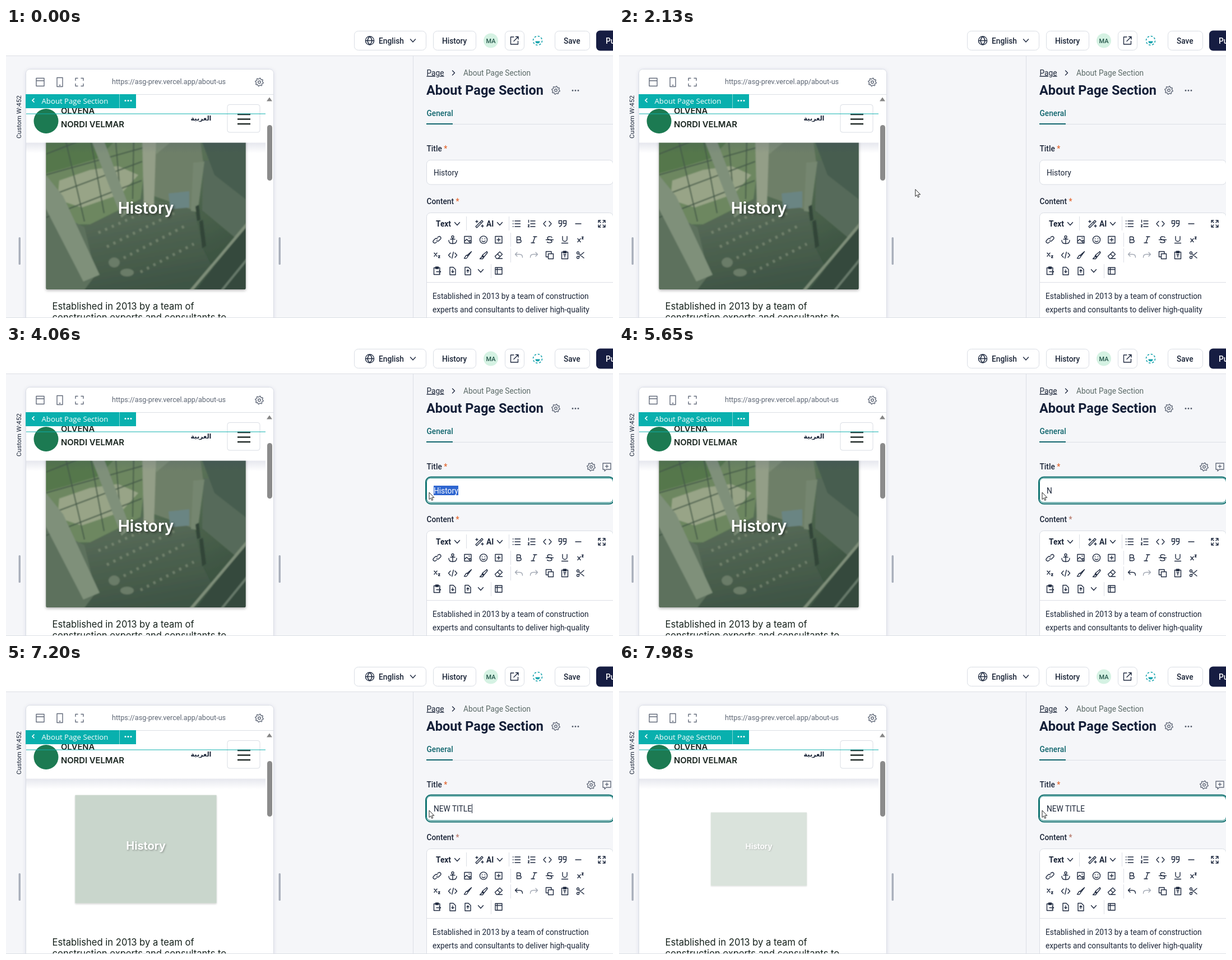
Recreate the animation shown at these times as an HTML page. Size 1083x517 px, loop 8 s.

```html
<!DOCTYPE html>
<html lang="en">
<head>
<meta charset="utf-8">
<title>Page section editor</title>
<style>
html, body { margin: 0; width: 100%; height: 100%; overflow: hidden; background: #f5f6f9; }
svg { display: block; }
text { font: 13.72px Roboto, sans-serif; fill: #1b2538; white-space: pre; }
.med { font-weight: 500; }
.bold { font-weight: 700; }
.site { font-family: Inter, sans-serif; font-size: 16.6px; fill: #16221c; }
.brand { font: 600 14.8px Inter, sans-serif; fill: #16221c; }
.card { fill: #fff; stroke: #d9dde4; }
.line { stroke: #dcdfe5; fill: none; }
.icon { fill: none; stroke: #1f2a40; stroke-width: 1.4; stroke-linecap: round; stroke-linejoin: round; }
.gray { stroke: #636b7b; }
</style>
</head>
<body>
<svg width="1083" height="517" viewBox="0 0 1083 517">
  <defs>
    <linearGradient id="room" x2=".6" y2="1"><stop stop-color="#6f8766"/><stop offset="1" stop-color="#3a5140"/></linearGradient>
    <linearGradient id="floor" x2=".3" y2="1"><stop stop-color="#5d705c"/><stop offset="1" stop-color="#3e5444"/></linearGradient>
    <linearGradient id="fade" x2="0" y2="1"><stop stop-color="#2b3570" stop-opacity=".12"/><stop offset="1" stop-color="#2b3570" stop-opacity="0"/></linearGradient>
    <filter id="blur"><feGaussianBlur stdDeviation="1.3"/></filter>
    <filter id="drop" x="-10%" y="-10%" width="120%" height="120%"><feDropShadow dx="0" dy="2" stdDeviation="2.5" flood-opacity=".3"/></filter>
    <filter id="textDrop" x="-20%" y="-40%" width="140%" height="190%"><feDropShadow dx="2" dy="2" stdDeviation="2" flood-opacity=".5"/></filter>
    <filter id="soft" x="-5%" y="-5%" width="110%" height="110%"><feDropShadow dx="0" dy="1" stdDeviation="3" flood-color="#30405f" flood-opacity=".1"/></filter>
    <clipPath id="photoClip"><rect x="71.5" y="194" width="356" height="272" rx="2"/></clipPath>
    <clipPath id="pageClip"><rect x="36" y="204.5" width="427" height="313"/></clipPath>
    <clipPath id="selClip"><rect id="selArea" y="249" width="44" height="17"/></clipPath>
  </defs>

  <!-- top bar -->
  <rect width="1083" height="49" fill="#fff"/>
  <path class="line" d="M0 49.5H1083M726.5 50V517"/>
  <g class="card">
    <rect x="621.5" y="5.5" width="128" height="34" rx="7"/>
    <rect x="762.5" y="5.5" width="76" height="34" rx="7"/>
    <rect x="890.5" y="5.5" width="34" height="34" rx="7"/>
    <rect x="979.5" y="5.5" width="62" height="34" rx="7"/>
  </g>
  <text class="med" x="665" y="27.5">English</text>
  <text class="med" x="778" y="27.5">History</text>
  <circle cx="865" cy="22.5" r="13" fill="#d5f2e3"/>
  <text class="med" x="865" y="26.5" text-anchor="middle" style="font-size:11px;fill:#24564a">MA</text>
  <g fill="none" stroke="#16a3ad" stroke-width="1.6">
    <circle cx="948.5" cy="22.5" r="8" stroke-dasharray="3.4 2.88"/>
    <path d="M944.5 23.500a4 4 0 0 0 8 0z" fill="#16a3ad" stroke="none"/>
  </g>
  <text class="med" x="995" y="27.5">Save</text>
  <rect x="1053" y="4.5" width="60" height="36" rx="7" fill="#161d42"/>
  <text class="med" x="1070" y="27.5" style="fill:#fff">Pu</text>

  <!-- preview -->
  <text transform="translate(27 197)rotate(-90)" style="font-size:11.75px">Custom W:452</text>
  <g fill="#a9afbb"><rect x="22.5" y="373" width="3.5" height="49" rx="1.5"/><rect x="486.5" y="373" width="3.5" height="49" rx="1.5"/></g>
  <rect class="card" x="35.5" y="73.5" width="442" height="460" rx="7" filter="url(#soft)"/>
  <path class="line" d="M36 118.5H477"/>
  <text x="189" y="99.5" style="font-size:12.6px;fill:#5d6674">https://asg-prev.vercel.app/about-us</text>

  <g clip-path="url(#pageClip)">
    <g id="hero">
      <g id="photo" filter="url(#drop)"><g clip-path="url(#photoClip)">
        <rect x="71" y="194" width="357" height="273" fill="url(#room)"/>
        <g filter="url(#blur)">
          <path fill="#6d8760" d="M60 190H255L240 305 150 350 60 350z"/>
          <path fill="#55774b" d="M60 190H205L165 232 105 250 60 262z"/>
          <path fill="#98a487" d="M95 272 150 253 200 246 236 262 205 296 135 320 92 306z"/>
          <path fill="url(#floor)" d="M140 355 245 305 335 320 352 395 395 480H100z"/>
          <path fill="#5d715d" d="M60 315 140 355 160 440 130 480H60z"/>
          <path fill="#6e7f68" d="M262 190H345L352 240 335 325 265 300z"/>
          <path fill="#566a5a" d="M352 236H440V400L350 325z"/>
          <path fill="#475d50" d="M345 190H440V315L372 262z"/>
          <path fill="#7d8d74" d="M262 190H310L268 225z"/>
          <g fill="none" stroke="#465c4a" stroke-width="2">
            <path d="M71 262 250 212M71 302 243 238M71 338 242 272M105 194 140 345M150 194 175 330M195 194 205 310M228 194 226 305M71 225 150 194"/>
            <path stroke="#8e9b83" stroke-width="5" stroke-dasharray="4 9" d="M165 365 265 320M180 390 300 330M210 410 325 350M240 435 335 385" opacity=".55"/>
          </g>
          <path fill="#7f907a" d="M71 262 102 300 167 440 138 452 71 322zM150 194H172L222 325 206 338z"/>
          <path fill="#939e87" d="M243 194H268L264 318 246 322z"/>
          <path fill="#75866f" d="M334 240 354 238 342 328 330 326z"/>
          <path fill="#6b8583" d="M290 295 327 291V320L293 323z"/>
          <path fill="#304439" d="M345 345 351 342 357 388 350 393zM338 318 344 315 347 342 341 344z"/>
          <path fill="#34493c" d="M330 480 440 335V480z"/>
          <path stroke="#7d8d78" stroke-width="5" d="M320 480 440 338"/>
          <path stroke="#67796a" stroke-width="4" d="M375 480 440 400"/>
          <g fill="#6a7b68"><ellipse cx="193" cy="418" rx="10" ry="9"/><ellipse cx="216" cy="436" rx="12" ry="7"/></g>
        </g>
      </g></g>
      <rect id="tint" x="71.5" y="194" width="356" height="272" fill="#b4c6b8" filter="url(#drop)"/>
      <text class="site" x="249.5" y="331" text-anchor="middle" filter="url(#textDrop)" style="font-size:28.4px;font-weight:600;fill:#fff">History</text>
    </g>
    <text class="site" x="82.5" y="502">Established in 2013 by a team of</text>
    <text class="site" x="82.5" y="522">construction experts and consultants to</text>
    <rect x="36" y="204" width="427" height="19" fill="url(#fade)"/>
  </g>

  <circle cx="71.5" cy="166" r="22" fill="#1c7a52"/>
  <text class="brand" x="98" y="153">OLVENA</text>
  <text class="brand" x="98" y="177">NORDI VELMAR</text>
  <text x="348" y="165" text-anchor="middle" style="font:bold 11.2px 'DejaVu Sans',sans-serif">العربية</text>
  <rect x="395" y="136.5" width="58" height="49.5" rx="4" class="card"/>
  <path d="M413 154H436M413 162.5H436M413 171H436" stroke="#222b28" stroke-width="2.4"/>
  <path d="M36 153H463" stroke="#0fb0ae"/>
  <path d="M35 118H232V143H35z" fill="#08b0ae"/>
  <path d="M202.5 118V143" stroke="#7fd6d4"/>
  <path d="M50.5 125.5 47 129l3.5 3.5" fill="none" stroke="#fff" stroke-width="1.6"/>
  <text x="63.5" y="135" style="font:13.2px 'Open Sans',sans-serif;fill:#fff">About Page Section</text>
  <g fill="#fff"><circle cx="213" cy="129.5" r="1.5"/><circle cx="218" cy="129.5" r="1.5"/><circle cx="223" cy="129.5" r="1.5"/></g>
  <path d="M465 130.5 470 123.5 475 130.5z" fill="#868686"/>
  <rect x="466" y="173" width="9" height="99" rx="4.5" fill="#8b8b8b"/>

  <!-- settings panel -->
  <text x="750.5" y="84.5" style="text-decoration:underline;text-underline-offset:2px">Page</text>
  <path class="icon" d="M796.5 76 800.5 80 796.5 84"/>
  <text x="816" y="84.5" style="fill:#5c6b68">About Page Section</text>
  <text class="bold" x="750" y="119" style="font-size:23.5px;fill:#141f38">About Page Section</text>
  <g fill="#555d6c"><circle cx="1011" cy="111.5" r="1.4"/><circle cx="1016" cy="111.5" r="1.4"/><circle cx="1021" cy="111.5" r="1.4"/></g>
  <text class="med" x="750.5" y="157" style="fill:#11666e">General</text>
  <path class="line" d="M750 171.5H1083"/>
  <path d="M750 171H797" stroke="#11666e" stroke-width="2"/>
  <text class="med" x="750.5" y="220">Title <tspan fill="#e4662f">*</tspan></text>
  <text class="med" x="750.5" y="313.5">Content <tspan id="star">*</tspan></text>
  <rect id="ring" x="749" y="233.5" width="336" height="48" rx="9" fill="#fff" stroke="#11706f" stroke-width="2"/>
  <rect class="card" x="750.5" y="235.5" width="333" height="43.5" rx="7"/>
  <rect id="accent" x="750.5" y="235.5" width="333" height="43.5" rx="7" fill="none" stroke="#11807c"/>
  <text id="field" x="763" y="262.5"></text>
  <g id="selection" clip-path="url(#selClip)">
    <rect x="763" y="249" width="44" height="17" fill="#2f66d0"/>
    <text x="763" y="262.5" style="fill:#fff">History</text>
  </g>
  <path id="caret" d="M.5 249.5V266" stroke="#1b2538"/>

  <rect class="card" x="750.5" y="329.5" width="333" height="220" rx="7"/>
  <path class="line" d="M751 453.5H1083M821.5 336V361M897.5 336V361M900.5 365V390M900.5 393V418M865.5 421V446"/>
  <text class="bold" x="767" y="354">Text</text>
  <text class="bold" x="857" y="354">AI</text>
  <text x="761" y="482.5">Established in 2013 by a team of construction</text>
  <text x="761" y="507">experts and consultants to deliver high-quality</text>

  <g id="icons"></g>
  <g id="titleTools"></g>
  <g id="contentTools"></g>
  <path class="line" d="M0 516.5H1083"/>
  <path id="arrow" d="M0 0v12.5l2.8-2.6 1.9 4.4 2-.9-1.9-4.2h4z" fill="#fff" stroke="#111" stroke-width=".9"/>
  <path id="beam" d="M-3-6h2l1 .8 1-.8h2M-3 6h2l1-.8 1 .8h2M0-5.2V5.2" fill="none" stroke="#111" stroke-width="1.1"/>
</svg>
<script>
const $ = id => document.getElementById(id);
const clamp = v => Math.min(1, Math.max(0, v));
const show = (id, opacity) => $(id).setAttribute('opacity', +opacity);
const move = (id, x, y) => $(id).setAttribute('transform', `translate(${x} ${y})`);

const circle = (r, x = 0, y = 0) => `M${x - r} ${y}a${r} ${r} 0 1 0 ${2 * r} 0a${r} ${r} 0 1 0 ${-2 * r} 0`;
const cog = 'M' + Array.from({ length: 32 }, (_, i) => {
  const r = i % 4 < 2 ? 7.2 : 5.6, a = (i + .5) * Math.PI / 16;
  return (r * Math.cos(a)).toFixed(1) + ' ' + (r * Math.sin(a)).toFixed(1);
}).join(' ') + 'z' + circle(2.3);
const box = 'M-6-6h12v12h-12z', doc = 'M-5-6.5h6l4 4v9.5h-10z', clip = 'M-2.5-7h5v3h-5z';
const shapes = {
  cog, layout: 'M-7-7h14v14h-14zM-7-2.5h14', phone: 'M-5-8h10v16h-10zM-1 5.5h2',
  corners: 'M-7-3v-4h4M3-7h4v4M7 3v4h-4M-3 7h-4v-4', chevron: 'M-4.5-2.5 0 2.5 4.5-2.5',
  globe: circle(7.6) + 'M-7.6 0h15.2M0-7.6c-5 5-5 10.2 0 15.2c5-5 5-10.2 0-15.2',
  open: 'M-1-6.5h-5.5v13h13v-5.5M2.5-7h4.5v4.5M7-7-1 1',
  expand: 'M-6-2v-4h4M2-6h4v4M6 2v4h-4M-2 6h-4v-4M-6-6-2-2M6-6 2-2M6 6 2 2M-6 6-2 2',
  bullets: 'M-3-5h9.5M-3 0h9.5M-3 5h9.5M-6.5-5h.5M-6.5 0h.5M-6.5 5h.5',
  numbers: 'M-2-5h8M-2 0h8M-2 5h8M-5.5-6.5v4M-6.5 2h2l-2 3.5h2',
  code: 'M-3-4.5-7 0-3 4.5M3-4.5 7 0 3 4.5',
  quote: 'M-6.5-5.5h5v5c0 3-1 4.5-4 5.5M-6.5-5.5v5h5M1.5-5.5h5v5c0 3-1 4.5-4 5.5M1.5-5.5v5h5',
  rule: 'M-5 0h10',
  link: 'M-1 4l-1.5 1.5a2.9 2.9 0 0 1-4-4l3-3a2.9 2.9 0 0 1 4 0M1-4l1.5-1.5a2.9 2.9 0 0 1 4 4l-3 3a2.9 2.9 0 0 1-4 0',
  anchor: 'M0-3v10M-4-1h8M-7 1c0 4 3 6 7 6s7-2 7-6' + circle(2, 0, -5),
  image: box + 'M-6 3-2-1 5 6M2 3 3.5 1 6 3.5M2-3h1', smile: circle(6.6) + 'M-3 2q3 3 6 0M-2.5-2v.5M2.5-2v.5',
  plus: box + 'M-3 0h6M0-3v6',
  bold: 'M-3.5-5.2h4a2.6 2.6 0 0 1 0 5.2h-4zM-3.5 0h5a2.6 2.6 0 0 1 0 5.2h-5z',
  italic: 'M-1-5.5h6M-5 5.5h6M2-5.5-2 5.5', strike: 'M4-4c-1-2.5-8-2-8 1c0 2 2 2.5 4 3s4 1 4 3c0 3-7 3-8.5 1M-6.5 0h13',
  underline: 'M-4-6v5a4 4 0 0 0 8 0v-5M-5.5 6h11',
  sup: 'M-5-2 0 4M0-2-5 4M2.5-5h2.5l-2.5 3.5h2.5', sub: 'M-5-4 0 2M0-4-5 2M2.5 1h2.5l-2.5 3.5h2.5',
  source: 'M-4-4-7.5 0-4 4M4-4 7.5 0 4 4M1.3-5.5-1.3 5.5',
  brush: 'M6.5-6.5-1 0l1.5 1.5zM-1.5 0c-3 0-3 4-5 5.5c3 1 6 0 6.5-4z', marker: 'M6-6.5-2 0 1 3 7-4.5zM-2 0-3 3 0 3M-6.5 6.5h5l2-3-3-1z',
  eraser: 'M-6.5 2 2-6 6.5-1.5-1 6h-3zM-2-2 2.5 2.5M-1 6h7.5',
  undo: 'M-3-5-6.5-1.5-3 2M-6.5-1.5h8c3 0 5 2 5 5.5', redo: 'M3-5 6.5-1.5 3 2M6.5-1.5h-8c-3 0-5 2-5 5.5',
  copy: 'M-2.5-2.5h9v9h-9zM-2.5 3h-4v-9.5h9.5v4', paste: 'M-5.5-5.5h11v12h-11zM-2-1h4M0-1v4.5' + clip,
  cut: circle(2, -4.5, -4) + circle(2, -4.5, 4) + 'M-3-2.5 6 5M-3 2.5 6-5',
  send: 'M5-1.5v-4h-10.5v12h10.5v-2M-1 1.5h7.5M4-1 6.5 1.5 4 4' + clip,
  docDown: doc + 'M0-2v5M-2 1 0 3 2 1', docUp: doc + 'M0 3v-5M-2 0 0-2 2 0',
  table: box + 'M-6-2.5h12M-2.5-6v12', wand: 'M-7 5 4-6 6-4-5 7zM1-3 3-1M-5-6v4M-7-4h4M5 2v4M3 4h4',
  comment: 'M-7-6.5h14v11h-8l-3 3v-3h-3zM-2.5-1h5M0-3.5v5'
};
function icon(name, x, y, cls = '', parent = 'icons') {
  $(parent).insertAdjacentHTML('beforeend',
    `<path id="${name}${x}" class="icon ${cls}" transform="translate(${x} ${y})" d="${shapes[name]}"/>`);
}
const row = (names, x, y) => names.split(' ').forEach((name, i) => icon(name, Math.round(x + 27.4 * i), y));

icon('globe', 649, 22.5); icon('chevron', 726, 22.5); icon('open', 907, 22.5);
icon('layout', 61, 96.5, 'gray'); icon('phone', 96, 96.5, 'gray'); icon('corners', 131, 96.5, 'gray');
icon('cog', 452, 96.5, 'gray'); icon('cog', 981, 111, 'gray');
icon('chevron', 805, 349); icon('wand', 845, 349); icon('chevron', 881, 349); icon('expand', 1063, 349);
row('bullets numbers code quote rule', 911, 349);
row('link anchor image smile plus', 769.4, 377.5);
row('bold italic strike underline sup', 915, 377.5);
row('sub source brush marker eraser', 769.4, 405);
row('undo redo copy paste cut', 915, 405);
row('send docDown docUp', 769.4, 433);
icon('chevron', 847, 433); icon('table', 879, 433);
$('redo942').style.stroke = '#a3a9b4';
for (const [group, y] of [['titleTools', 215.5], ['contentTools', 309.5]]) {
  icon('cog', 1044, y, 'gray', group);
  icon('comment', 1072, y, 'gray', group);
}

// time, x, y of the pointer
const path = [
  [720, 868, 498], [1060, 835, 251], [1850, 835, 251], [2400, 242, 322], [2540, 238, 328], [2610, 253, 327],
  [3100, 844, 307], [3440, 843, 258], [3510, 843, 259.5], [3710, 843, 259.5], [3990, 744, 266], [4060, 755, 261]
];
function pointer(t) {
  const i = path.findIndex(p => p[0] > t);
  if (i < 1) return path[i < 0 ? path.length - 1 : 0].slice(1);
  const [a, b] = [path[i - 1], path[i]];
  const u = (t - a[0]) / (b[0] - a[0]), k = u * u * (3 - 2 * u);
  return [a[1] + (b[1] - a[1]) * k, a[2] + (b[2] - a[2]) * k];
}

const typed = 'NEW TITLE', keys = [5120, 5720, 5780, 6380, 6520, 6650, 6850, 6990, 7060];
const hover = (t, from, to = 1e5) => clamp((t - from) / 110) - clamp((t - to) / 110);
const CLICK = 3710, RELOAD = 6850, ZOOMS = [6918, 7816], ZOOM_MS = 840;

function draw(now) {
  const t = now % 8000;
  const [x, y] = pointer(t);
  const overText = x > 760 && (y > 455 || (y > 236 && y < 279));
  move('arrow', x, y);
  move('beam', x, y);
  show('arrow', t >= 720 && !overText);
  show('beam', t >= 720 && overText);

  const titleHover = hover(t, 940, 1990) + hover(t, 3220);
  show('titleTools', titleHover);
  show('accent', titleHover);
  show('contentTools', hover(t, 720, 940) + hover(t, 3050, 3220));
  show('ring', t >= CLICK);

  const count = keys.filter(k => k <= t).length;
  $('field').textContent = count ? typed.slice(0, count) : 'History';
  $('selArea').setAttribute('x', Math.min(807, Math.max(763, x)));
  show('selection', t >= CLICK && !count);
  move('caret', Math.round(763 + $('field').getComputedTextLength()), 0);
  show('caret', count && (t - keys[count - 1]) % 1060 < 530);
  $('undo915').style.stroke = count ? '' : '#a3a9b4';
  $('star').setAttribute('fill', t < 5650 ? '#e4662f' : '#b5786a');

  const start = ZOOMS.filter(z => z <= t).pop() ?? t;
  const zoom = t < RELOAD ? 1 : 1 - (1 - clamp((t - start) / ZOOM_MS)) ** 3;
  $('hero').setAttribute('transform', `translate(249.5 330)scale(${zoom})translate(-249.5 -330)`);
  show('hero', zoom);
  $('photo').style.display = t < RELOAD ? '' : 'none';
  $('tint').style.display = t < RELOAD ? 'none' : '';
  requestAnimationFrame(draw);
}
requestAnimationFrame(draw);
</script>
</body>
</html>
```
